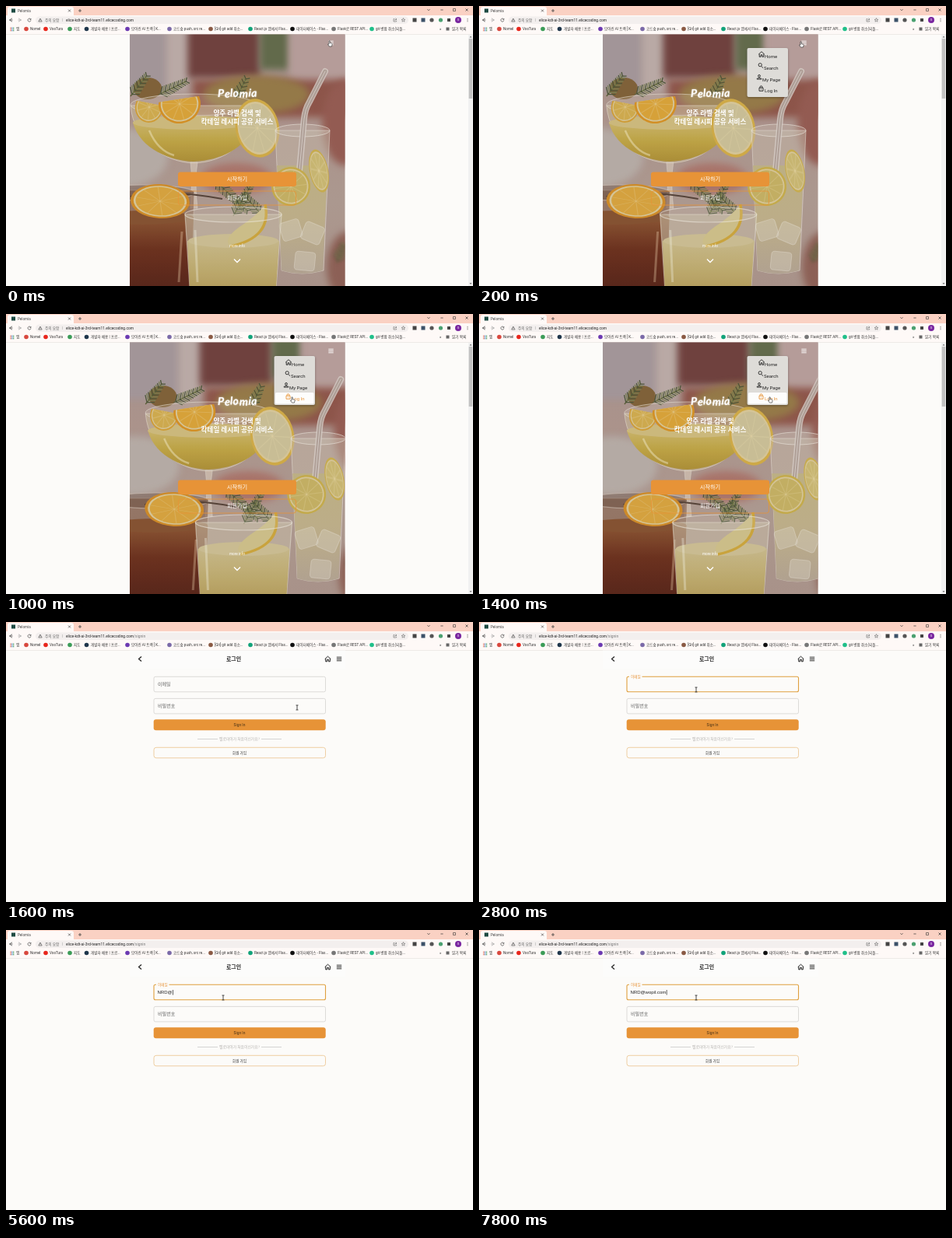
An HTML page with a canvas for the animation above (8 s loop, 600 by 360 pixels).

```html
<!DOCTYPE html>
<html lang="ko">
<head>
<meta charset="utf-8">
<title>Pelomia</title>
<style>
html, body { margin: 0; width: 100%; height: 100%; overflow: hidden; background: #fcfbf9; }
canvas { display: block; width: 600px; height: 360px; }
</style>
</head>
<body>
<canvas id="stage" width="600" height="360"></canvas>
<script>
const ctx = document.getElementById('stage').getContext('2d');
const LOOP = 8000, STEP = 200;
const MENU_AT = 200, SIGNIN_AT = 1600, FOCUS_AT = 2200, BLINK = 530;
const KR = '"Noto Sans CJK KR", "Noto Sans CJK JP", "Noto Sans CJK", sans-serif';
const UI = 'Roboto, "Noto Sans CJK KR", sans-serif';
const ORANGE = '#e79337', INK = '#333';

// ---------- helpers ----------
function rect(x, y, w, h, fill) {
  ctx.fillStyle = fill;
  ctx.fillRect(x, y, w, h);
}
function paint(p, fill, stroke, lw) {
  if (fill) { ctx.fillStyle = fill; ctx.fill(p); }
  if (stroke) { ctx.strokeStyle = stroke; ctx.lineWidth = lw; ctx.stroke(p); }
}
function box(x, y, w, h, r, fill, stroke, lw = 1) {
  const p = new Path2D();
  p.roundRect(x, y, w, h, r);
  paint(p, fill, stroke, lw);
}
function oval(x, y, rx, ry, fill, rot = 0, stroke, lw = 1) {
  const p = new Path2D();
  p.ellipse(x, y, rx, ry, rot, 0, Math.PI * 2);
  paint(p, fill, stroke, lw);
}
function dot(x, y, r, fill) { oval(x, y, r, r, fill); }
function path(d, fill, stroke, lw = 1) { paint(new Path2D(d), fill, stroke, lw); }
function at(x, y, draw, rot = 0) {
  ctx.save();
  ctx.translate(x, y);
  ctx.rotate(rot);
  draw();
  ctx.restore();
}
function text(s, x, y, size, color, { align = 'left', weight = 400, font = KR } = {}) {
  ctx.font = `${weight} ${size}px ${font}`;
  ctx.textAlign = align;
  ctx.textBaseline = 'alphabetic';
  ctx.fillStyle = color;
  ctx.fillText(s, x, y + size * 0.36);
}
function vertical(y0, y1, ...colors) {
  const g = ctx.createLinearGradient(0, y0, 0, y1);
  colors.forEach((c, i) => g.addColorStop(i / (colors.length - 1), c));
  return g;
}

// ---------- browser ----------
const shapes = {
  left: 'M2 -2.2L-1.5 0L2 2.2M-1.5 0H2.5',
  right: 'M-2 -2.2L1.5 0L-2 2.2M1.5 0H-2.5',
  reload: 'M1.7 -1A2 2 0 1 0 2 .5M2 -2V-.6H.6',
  close: 'M-1.5 -1.5L1.5 1.5M1.5 -1.5L-1.5 1.5',
  plus: 'M-2 0H2M0 -2V2',
  down: 'M-1.6 -.8L0 .8L1.6 -.8',
  minus: 'M-1.6 0H1.6',
  square: 'M-1.5 -1.5H1.5V1.5H-1.5Z',
  warn: 'M0 -2L2.2 2H-2.2ZM0 -.6V.7',
  share: 'M-.8 -1.5H-2V2H1.6V.8M-.8 .7Q-.6 -1 1.8 -1M.6 -2.2L2 -1L.6 .2',
  star: 'M0 -2.4L.7 -.7L2.4 -.6L1.1 .5L1.5 2.2L0 1.2L-1.5 2.2L-1.1 .5L-2.4 -.6L-.7 -.7Z',
  chevron: 'M-4 -2L0 2L4 -2',
  back: 'M2 -3L-1.5 0L2 3',
  bars: 'M-3.2 -2.2H3.2M-3.2 0H3.2M-3.2 2.2H3.2',
  home: 'M-3.8 .2L0 -3.3L3.8 .2M-2.8 -.4V3.3H-.9V.8H.9V3.3H2.8V-.4',
  search: 'M.8 .8L3 3M1.3 -1A2.1 2.1 0 1 1 -2.9 -1A2.1 2.1 0 1 1 1.3 -1',
  person: 'M1.4 -1.5A1.4 1.4 0 1 1 -1.4 -1.5A1.4 1.4 0 1 1 1.4 -1.5M-2.8 2.7V1.9Q0 .1 2.8 1.9V2.7Z',
  lock: 'M-2.5 -1H2.5V3.1H-2.5ZM-1.4 -1V-2A1.4 1.4 0 0 1 1.4 -2V-1M0 .6V1.4'
};
function icon(name, x, y, color, lw = 1) {
  at(x, y, () => path(shapes[name], null, color, lw));
}

const bookmarks = [
  [26, '#d8483e', 31, 'Nomel'], [51, '#e8261c', 56, 'VooTura'], [82, '#3c9c58', 87, '지도'],
  [103.5, '#20374c', 109, '개발자 채용 | 프로...'], [156, '#6c3ab2', 161, '모아린 AI 트랙 [ K...'],
  [210, '#7b6aa8', 215, '코드숲 push, src re...'], [263, '#8a5a44', 268, '[Git] git add 취소...'],
  [314, '#12a37a', 319, 'React.js 앱에서 Flas...'], [368, '#111', 373, '데이터베이스 - Flas...'],
  [421, '#777', 426, 'Flask로 REST API...'], [470, '#20c08a', 475, 'git 병합 취소(되돌...']
];

function browser(signin) {
  rect(0, 0, 600, 13, '#fad1c3');
  box(2, 1, 85, 13, [3, 3, 0, 0], '#fef9f7');
  rect(0, 12, 600, 24, '#fef9f7');
  rect(0, 36, 600, 0.6, '#e4dfdc');
  rect(7, 3.5, 5, 5, '#1f4b43');
  text('Pelomia', 15, 6, 4.6, '#444', { font: UI });
  icon('close', 81.5, 6, '#444', 0.7);
  icon('plus', 95, 6, '#444', 0.8);
  icon('down', 543, 5, '#333', 0.7);
  icon('minus', 560, 5, '#333', 0.7);
  icon('square', 576, 5, '#333', 0.6);
  icon('close', 592, 5, '#333', 0.7);

  icon('left', 6, 18, '#555', 0.8);
  icon('right', 18, 18, '#aaa', 0.8);
  icon('reload', 30, 18, '#555', 0.8);
  box(38, 13.5, 479, 9.5, 4.7, '#f3efee');
  icon('warn', 44, 18, '#555', 0.7);
  text('주의 요함', 50, 18, 4.7, '#666');
  rect(72.5, 16, 0.5, 4, '#aaa');
  const host = 'elice-kdt-ai-3rd-team11.elicecoding.com';
  text(host, 77, 18, 4.9, '#222', { font: UI });
  if (signin) text('/signin', 77 + ctx.measureText(host).width, 18, 4.9, '#777', { font: UI });
  icon('share', 500, 18, '#666', 0.6);
  icon('star', 510.5, 18, '#666', 0.6);
  rect(522.5, 15.5, 5, 5, '#444');
  rect(533.5, 15.5, 5, 5, '#3b5168');
  dot(547, 18, 2.6, '#555');
  dot(558.5, 18, 2.6, '#4aa070');
  rect(567, 16, 4, 4, '#444');
  dot(581, 18, 4, '#7a27a0');
  text('S', 581, 18, 4, '#fff', { align: 'center', font: UI });
  for (let i = -1; i < 2; i++) dot(593, 18 + i * 1.7, 0.5, '#444');

  for (let i = 0; i < 9; i++)
    rect(5.5 + (i % 3) * 1.8, 27.5 + Math.floor(i / 3) * 1.8, 1.2, 1.2, ['#d8573f', '#4285d0', '#45a060'][i % 3]);
  text('앱', 13, 29.5, 4.7, INK);
  for (const [ix, color, tx, label] of bookmarks) {
    dot(ix, 29.5, 2.8, color);
    text(label, tx, 29.5, 4.6, INK, { font: UI });
  }
  text('»', 557, 29, 5, INK, { font: UI });
  rect(565.5, 27.5, 4, 4, '#666');
  text('읽기 목록', 573, 29.5, 4.7, INK);
}

// ---------- drinks footage ----------
function citrus(x, y, rx, ry, rot, rind, flesh, half) {
  at(x, y, () => {
    ctx.scale(1, ry / rx);
    if (half) { ctx.beginPath(); ctx.rect(-rx - 2, -rx * 0.25, rx * 2 + 4, rx * 2); ctx.clip(); }
    dot(0, 0, rx, rind);
    dot(0, 0, rx * 0.9, '#dfcf9f');
    dot(0, 0, rx * 0.83, flesh);
    ctx.globalAlpha = 0.25;
    for (let i = 0; i < 10; i++) {
      const a = i * Math.PI / 5 + 0.2;
      path(`M0 0L${Math.cos(a) * rx * 0.82} ${Math.sin(a) * rx * 0.82}`, null, '#f2e3b5', 1.2);
    }
  }, rot);
}
function sprig(x, y, len, rot) {
  at(x, y, () => {
    path(`M0 0H${len}`, null, '#5d6238', 1.3);
    for (let i = 3; i < len; i += 3) {
      const r = 8 - 4 * i / len;
      path(`M${i} 0l${r * 0.8} ${-r}M${i} 0l${r * 0.8} ${r}`, null, i % 2 ? '#4f5a3c' : '#7c8455', 1.3);
    }
  }, rot);
}
function backdrop() {
  rect(60, 30, 420, 340, vertical(36, 360, '#ad9a95', '#b39b93', '#b4a097', '#b09a90'));
  ctx.filter = 'blur(5px)';
  rect(60, 20, 150, 90, '#aa9da0');
  rect(206, 20, 28, 90, '#c2b2ae');
  rect(234, 20, 92, 72, '#744441');
  rect(326, 20, 38, 62, '#66704f');
  rect(364, 20, 120, 80, '#bea5a1');
  rect(240, 95, 205, 48, '#94594e');
  oval(322, 114, 68, 25, '#9b7f4b');
  oval(436, 150, 30, 55, '#9a6056');
  oval(150, 195, 58, 38, '#bdb3ad');
  oval(296, 222, 46, 20, '#b0796f');
  oval(440, 335, 28, 45, '#93655a');
  ctx.filter = 'blur(2px)';
  sprig(425, 330, 26, -1.2);
}
function coupe() {
  oval(182, 106, 18, 14, '#85663c');
  sprig(160, 116, 34, -0.9);
  sprig(196, 114, 40, -0.45);
  path('M160 128C164 175 205 201 241 202C280 201 318 176 322 128Z', 'rgba(212,198,160,.5)', 'rgba(244,236,222,.55)', 1);
  path('M163 150C173 185 212 199 241 200C276 198 309 184 319 150Z', vertical(148, 200, '#d3be72', '#c6ab48', '#b3953a'));
  oval(241, 150, 78, 9, '#d6c283');
  oval(241, 127, 81, 14, 'rgba(235,224,203,.18)', 0, 'rgba(246,240,228,.55)', 1);
  path('M237 201Q240 225 237 260H246Q242 225 246 201Z', 'rgba(224,209,192,.65)', 'rgba(250,245,235,.5)', 0.7);
  path('M184 160Q195 186 216 192', null, 'rgba(255,248,215,.45)', 2.5);
  sprig(296, 118, 28, -1.1);
  citrus(184, 130, 18, 20, 0.2, '#d9a53a', '#d8b252', true);
  citrus(223, 126, 27, 25, -0.15, '#dd9727', '#e1aa3c', true);
  citrus(323, 157, 28, 38, -0.2, '#d9b24a', '#d2c89d');
}
function tallGlass() {
  const straw = 'M374 245L383 145Q384 133 390 123L410 84';
  path('M346 160L354 340Q380 348 408 340L416 160Z', 'rgba(205,194,178,.5)', 'rgba(247,242,232,.5)', 1);
  path('M348 205L354 340Q380 348 407 340L413 205Z', vertical(200, 345, '#c6b98a', '#c6b78f', '#b9aa98'));
  oval(381, 160, 35, 8, 'rgba(230,223,210,.2)', 0, 'rgba(248,244,236,.6)', 1);
  ctx.lineCap = 'round';
  path(straw, null, 'rgba(226,217,210,.8)', 8);
  path(straw, null, 'rgba(178,162,152,.85)', 5);
  path(straw, null, 'rgba(245,240,236,.6)', 1);
  ctx.lineCap = 'butt';
  citrus(366, 232, 25, 25, 0.3, '#cdb450', '#ccb868');
  citrus(402, 212, 12, 28, -0.2, '#d0b552', '#d1bf77');
  for (const [x, y, r] of [[384, 328, 0.1], [366, 288, -0.3], [394, 292, 0.4]])
    at(x, y, () => box(-13, -12, 26, 24, 4, 'rgba(226,217,202,.4)', 'rgba(250,245,236,.35)'), r);
}
function teaGlass() {
  path('M108 237L126 360H238L242 237Z', 'rgba(142,105,84,.65)', 'rgba(240,225,210,.4)', 1);
  path('M110 272L126 360H238L241 272Z', vertical(265, 360, '#96603a', '#703420', '#5c281c'));
  oval(175, 272, 66, 9, '#8a5634');
  oval(175, 240, 67, 10, 'rgba(92,67,53,.35)', 0, 'rgba(232,220,208,.5)', 1.2);
  path('M160 245Q210 235 278 248', null, '#59463b', 2);
  citrus(198, 251, 38, 22, 0.05, '#d8922a', '#dfaa42');
  path('M226 290L222 355', null, 'rgba(245,218,180,.35)', 3);
}
function frontGlass() {
  sprig(268, 224, 58, 0.75);
  sprig(292, 270, 48, -1.05);
  sprig(328, 268, 36, -2.3);
  path('M230 268L236 362H347L354 268Z', 'rgba(206,195,172,.6)', 'rgba(248,243,230,.5)', 1.2);
  path('M233 302L236 362H347L351 302Z', vertical(298, 360, '#d0c294', '#c9b77b', '#bda764'));
  oval(292, 302, 58, 9, '#d3c699');
  path('M333 255Q342 298 288 309Q278 300 300 284Q322 270 333 255Z', '#d5c88f');
  path('M333 255Q342 298 288 309', null, '#d3ac40', 3.5);
  oval(292, 268, 62, 10, 'rgba(235,228,212,.16)', 0, 'rgba(250,246,236,.6)', 1.2);
  path('M243 288L246 355', null, 'rgba(255,255,240,.35)', 3);
}
// Each layer drifts right at its own share of the pan speed.
const layers = [[backdrop, 0.8], [coupe, 1], [tallGlass, 1.05], [teaGlass, 0.95], [frontGlass, 0.7]];
function footage(t) {
  ctx.save();
  ctx.beginPath();
  ctx.rect(159, 36.5, 276.5, 324);
  ctx.clip();
  for (const [layer, share] of layers) {
    at(t * 0.0192 * share, 0, () => {
      ctx.filter = 'blur(0.7px)';
      layer();
    });
  }
  ctx.restore();
  rect(159, 36.5, 276.5, 324, 'rgba(40,25,20,.06)');
}

// ---------- pages ----------
function logo(word, cx, y) {
  ctx.save();
  ctx.font = 'italic 700 14px Lato, sans-serif';
  ctx.textAlign = 'left';
  ctx.textBaseline = 'alphabetic';
  ctx.fillStyle = '#fff';
  ctx.shadowColor = 'rgba(255,255,255,.8)';
  ctx.shadowBlur = 2;
  const gap = 0.5, widths = [...word].map(c => ctx.measureText(c).width + gap);
  let x = cx - widths.reduce((a, b) => a + b) / 2;
  [...word].forEach((c, i) => {
    at(x, y + Math.sin(i * 2.1) * 0.6, () => ctx.fillText(c, 0, 0), Math.sin(i * 1.7) * 0.07);
    x += widths[i];
  });
  ctx.restore();
}

const items = [
  ['home', 363, 'Home', 367], ['search', 362, 'Search', 366],
  ['person', 360, 'My Page', 364], ['lock', 362.5, 'Log In', 367]
];
function menu(cy) {
  ctx.save();
  ctx.shadowColor = 'rgba(0,0,0,.35)';
  ctx.shadowBlur = 3;
  ctx.shadowOffsetY = 1;
  box(344.5, 54, 52.5, 63, 2, '#dedcd8');
  ctx.restore();
  const hover = Math.floor((cy - 56.5) / 14.7);
  items.forEach(([name, ix, label, tx], i) => {
    const y = 62 + i * 14.7, on = i === hover;
    if (on) box(346, y - 5, 49.5, 14.5, 1.5, '#fdfdfc');
    const color = on && i === 3 ? ORANGE : '#222';
    icon(name, ix, y, color, 0.9);
    text(label, tx, y + 3.2, 6, color, { font: UI });
  });
}

function landing(t, cy) {
  footage(t);
  const mid = { align: 'center' }, bold = { align: 'center', weight: 700 };
  icon('bars', 417.5, 47.5, '#fff', 1.1);
  logo('Pelomia', 297.5, 117);
  text('양주 라벨 검색 및', 297, 138, 8.6, '#fff', bold);
  text('칵테일 레시피 공유 서비스', 297, 149, 8.6, '#fff', bold);
  box(221, 213.5, 152, 18.5, 3, ORANGE);
  text('시작하기', 297, 222.5, 7.2, '#fff', mid);
  box(221.5, 238, 151, 18, 3, null, ORANGE, 0.8);
  text('회원가입', 297, 246.5, 7, '#fff', mid);
  text('more info', 297, 308.5, 4.7, '#fff', { align: 'center', font: UI });
  icon('chevron', 297, 327.5, '#fff', 1.4);
  rect(594, 37, 6, 323, '#f1f1f1');
  rect(594.7, 42, 4.6, 77, '#c1c1c1');
  path('M595.5 40.5L597 38.5L598.5 40.5Z', '#777');
  path('M595.5 356L597 358L598.5 356Z', '#777');
  if (t >= MENU_AT) menu(cy);
}

// The name is typed, erased, typed again; then the domain follows letter by letter.
const MAIL = 'NRD@wopil.com';
const keys = [[FOCUS_AT, 0], [3400, 2], [3600, 3], [4200, 2], [4400, 1], [4600, 0], [5200, 1], [5400, 3], [5600, 4]];
for (let n = 5; n <= MAIL.length; n++) keys.push([6200 + (n - 5) * STEP, n]);

function typing(t) {
  const [last, count] = keys.filter(k => k[0] <= t).pop();
  return { value: MAIL.slice(0, count), caret: Math.floor((t - last) / BLINK) % 2 === 0 };
}
function signin(t) {
  const focus = t >= FOCUS_AT, mid = { align: 'center' };
  rect(159, 36.6, 277, 24, '#fcfcfb');
  icon('back', 172, 47.5, '#222', 1.2);
  text('로그인', 292.5, 48, 6.9, '#222', { align: 'center', weight: 700 });
  icon('home', 413.5, 47.5, '#222', 1);
  icon('bars', 428, 47.5, '#222', 1.1);

  box(190, 70.3, 220.5, 19.5, 2, null, focus ? '#dfa03f' : '#cfcdca', focus ? 1.1 : 0.7);
  if (focus) {
    rect(193, 69, 16.5, 3, '#fcfbf9');
    text('이메일', 195, 70, 4.6, ORANGE);
    const { value, caret } = typing(t);
    text(value, 194.5, 80, 6, '#222', { font: '"Liberation Sans", Arial, sans-serif' });
    if (caret) rect(195 + ctx.measureText(value).width, 77, 0.7, 6.5, '#222');
  } else {
    text('이메일', 195, 80, 6, '#666');
  }
  box(190, 98.4, 220.5, 19.5, 2, null, '#cfcdca', 0.7);
  text('비밀번호', 195, 107.5, 6.1, '#666');
  box(189.7, 125.2, 221, 14, 3, ORANGE);
  text('Sign In', 300, 132, 4.9, '#4b3318', { align: 'center', font: UI });
  rect(246, 150, 26, 0.6, '#bbb');
  rect(328, 150, 26, 0.6, '#bbb');
  text('펠로미아가 처음이신가요?', 300, 150, 4.8, '#b3b0ad', mid);
  box(190, 161.3, 220.5, 13.5, 3, null, '#ebc38d', 0.8);
  text('회원 가입', 300, 168, 4.7, INK, mid);
}

// ---------- pointer ----------
const track = [
  [0, 416, 48], [200, 414, 49], [400, 396, 62], [600, 376, 77], [800, 371, 94],
  [1000, 368, 110], [1400, 374, 110], [1600, 374, 110], [2000, 285, 88], [2200, 279, 87], [LOOP, 279, 87]
];
function pointer(t) {
  const i = track.findIndex(k => k[0] > t), [t0, x0, y0] = track[i - 1], [t1, x1, y1] = track[i];
  const f = (t - t0) / (t1 - t0);
  return [x0 + (x1 - x0) * f, y0 + (y1 - y0) * f];
}
function hand(x, y) {
  at(x, y, () => path('M-1 -3Q-.3 -3.6 .2 -3V-.4L2.6 .2Q3.3 .5 3.1 1.4L2.5 4H-.6L-2.6 1.3Q-2.4 .5 -1 1.2Z', '#fff', '#222', 0.6));
}
function beam(x, y) {
  at(x, y, () => path('M-1.5 -3H1.5M0 -3V3M-1.5 3H1.5', null, '#222', 0.8));
}

function draw(t) {
  const inside = t >= SIGNIN_AT, [x, y] = pointer(t);
  rect(0, 0, 600, 360, '#fcfbf9');
  browser(inside);
  if (inside) { signin(t); beam(x, y); }
  else { landing(t, y); hand(x, y); }
}

let shown = -1;
function tick(now) {
  const t = Math.floor((now % LOOP) / STEP) * STEP;
  if (t !== shown) draw(shown = t);
  requestAnimationFrame(tick);
}
draw(0);
requestAnimationFrame(tick);
</script>
</body>
</html>
```
